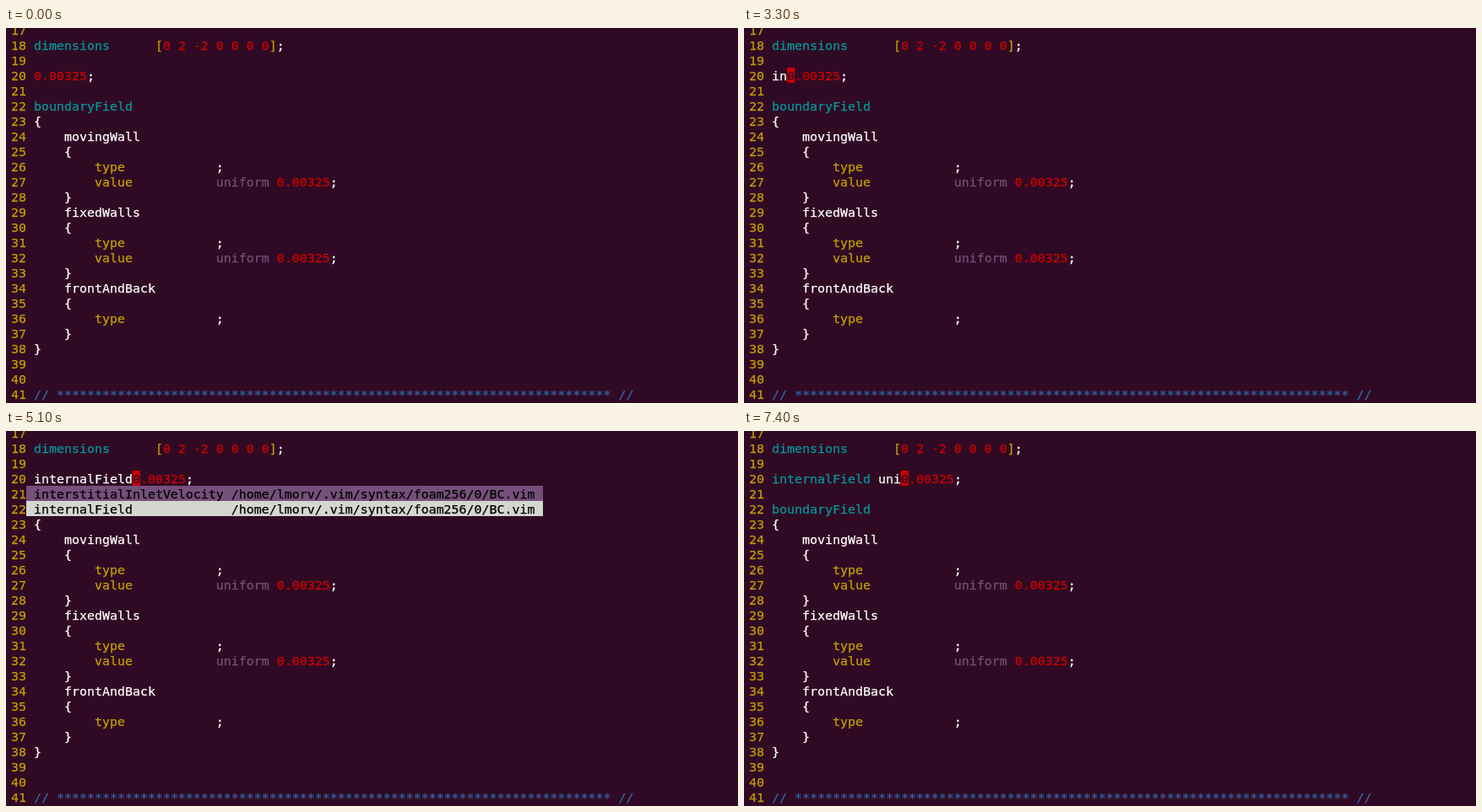
An HTML page for the animation above (8 s loop, 867 by 445 pixels).

```html
<!DOCTYPE html>
<html lang="en">
<head>
<meta charset="utf-8">
<title>Editor completion</title>
<style>
  html, body { margin: 0; width: 100%; height: 100%; overflow: hidden; background: #300a24; }
  #stage { position: relative; width: 867px; height: 445px; overflow: hidden; background: #300a24; }
  /* the taller line box sets the text 1px lower in its 18px cell */
  .row {
    position: absolute; height: 18px; white-space: pre;
    font: 14.95px/20px "DejaVu Sans Mono", monospace;
    font-variant-ligatures: none; color: #fff;
    -webkit-text-stroke: 0.25px;
  }
  .num, .key { color: #c4a000; }
  .cyan { color: #06989a; }
  .red { color: #cc0000; }
  .plum { color: #75507b; }
  .blue { color: #3465a4; }
  .cursor { background: #cc0000; color: #300a24; display: inline-block; width: 9px; height: 18px; vertical-align: top; }
  .item { background: #75507b; color: #000; width: 612px; }
  .item.on { background: #d3d7cf; }
</style>
</head>
<body>
<div id="stage"></div>
<script>
const CELL = 9, LINE = 18, LEFT = 33;
const stage = document.getElementById('stage');
const rowTop = n => 47 + (n - 20) * LINE;
const span = (cls, text) => `<span class="${cls}">${text}</span>`;

function addRow(n, x, html, cls = '') {
  const el = document.createElement('div');
  el.className = 'row ' + cls;
  el.style.left = x + 'px';
  el.style.top = rowTop(n) + 'px';
  el.innerHTML = html;
  return stage.appendChild(el);
}

const pad = n => ' '.repeat(n);
const type = pad(8) + span('key', 'type') + pad(12) + ';';
const value = pad(8) + span('key', 'value') + pad(11) +
  span('plum', 'uniform') + ' ' + span('red', '0.00325') + ';';
const open = pad(4) + '{', close = pad(4) + '}';

const lines = [
  '',
  span('cyan', 'dimensions') + pad(6) + span('key', '[') +
    span('red', '0 2 -2 0 0 0 0') + span('key', ']') + ';',
  '', '', '',
  span('cyan', 'boundaryField'),
  '{',
  pad(4) + 'movingWall', open, type, value, close,
  pad(4) + 'fixedWalls', open, type, value, close,
  pad(4) + 'frontAndBack', open, type, close,
  '}', '', '',
  span('blue', '// ' + '*'.repeat(73) + ' //')
];
lines.forEach((html, i) => {
  addRow(17 + i, LEFT - 3 * CELL, span('num', 17 + i));
  if (html) addRow(17 + i, LEFT, html);
});

const edit = addRow(20, LEFT, '');
const words = ['interstitialInletVelocity', 'internalField'];
const menu = words.map((word, i) => addRow(21 + i, LEFT - CELL,
  ' ' + word.padEnd(26) + '/home/lmorv/.vim/syntax/foam256/0/BC.vim ', 'item'));

// [start ms, typed text, cursor visible, selected menu item]
const steps = [
  [0, '', 0], [500, '', 1], [1100, '', 0], [1600, '', 1], [2200, '', 0], [2700, '', 1],
  ...[...'inter'].map((c, i, all) => [3200 + i * 100, all.slice(0, i + 1).join(''), 1]),
  [4200, 'inter', 0],
  [5000, words[0], 1, 0],
  [5100, words[1], 1, 1], [5600, words[1], 0, 1], [6200, words[1], 1, 1],
  [6300, words[1] + ' ', 1], [6800, words[1] + ' ', 0],
  [7100, words[1] + ' u', 1], [7300, words[1] + ' un', 1], [7400, words[1] + ' uni', 1]
];
const LOOP = 8000;
let shown;

function draw(step) {
  const [, text, cursor, pick] = step;
  const typed = text.replace(/^internalField(?= )/, word => span('cyan', word));
  edit.innerHTML = typed + span(cursor ? 'cursor' : 'red', '0') + span('red', '.00325') + ';';
  menu.forEach((el, i) => {
    el.style.display = pick === undefined ? 'none' : 'block';
    el.classList.toggle('on', i === pick);
  });
}

function tick() {
  const t = performance.now() % LOOP;
  const step = steps.findLast(s => s[0] <= t);
  if (step !== shown) draw(shown = step);
  requestAnimationFrame(tick);
}
tick();
</script>
</body>
</html>
```
